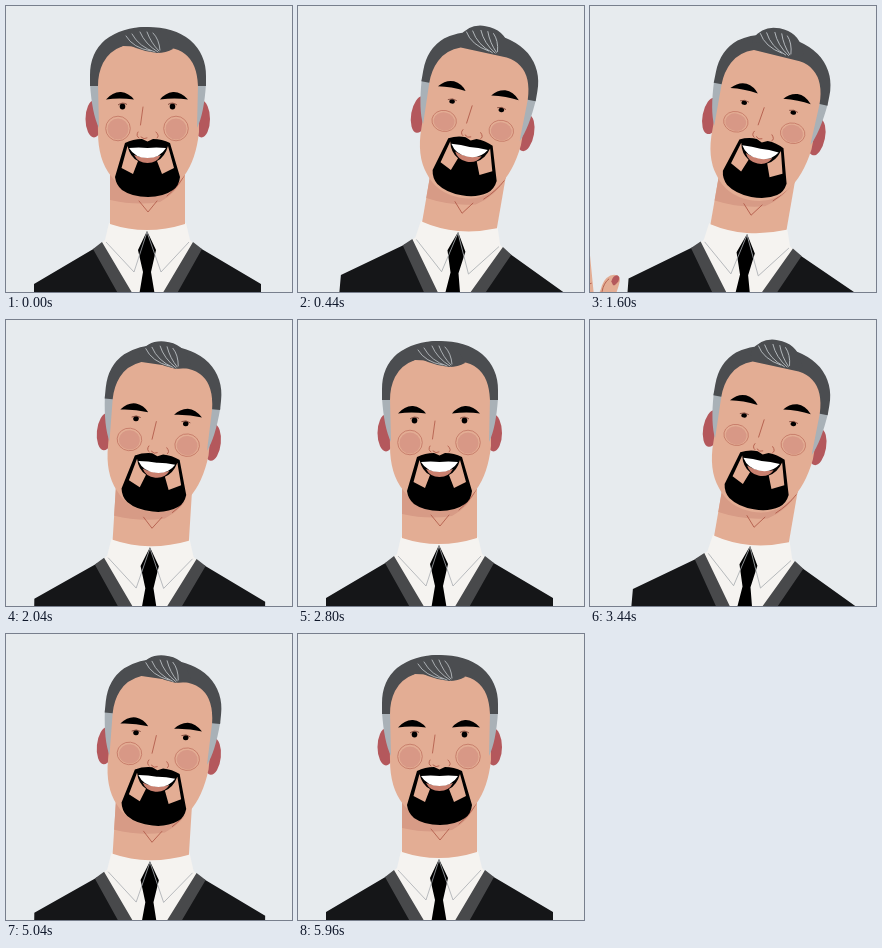
An HTML page that plays this animation: 286 by 286 pixels, repeating every 6000 ms.

```html
<!DOCTYPE html>
<html lang="en">
<head>
<meta charset="utf-8">
<title>Waving man</title>
<style>
  html, body { margin: 0; width: 100%; height: 100%; overflow: hidden; background: #e7ebee; }
  svg { display: block; width: 100vw; height: 100vh; }
  .skin { fill: #e3ad94; }
  .hair { fill: #4b4d50; }
  .grey { fill: #a9b1b7; }
  .ear { fill: #b4585c; }
  .line { fill: none; stroke: #b5604f; stroke-width: .9; stroke-linecap: round; stroke-linejoin: round; }
  .strand { fill: none; stroke: #c3c8cc; stroke-width: .8; stroke-linecap: round; }
  .seam { fill: none; stroke: #a9adb1; stroke-width: .8; stroke-linejoin: round; }
</style>
</head>
<body>
<svg viewBox="0 0 286 286" preserveAspectRatio="xMidYMid slice">
  <g id="hand">
    <path class="skin" d="M-32 340 L-24 222 Q-22 209 -13 210 Q-5 212 -6 224 L-9 268 Q-4 280 -2 272 L6 226 Q7 218 13 219 Q18 221 17 229 L11 292 Q17 290 21 281 Q27 272 35 273 Q42 275 39 281 Q33 295 18 312 L14 340Z"/>
    <path class="line" d="M6 237 Q10 240 15 238 M4 256 Q8 259 13 257 M2 276 Q6 279 11 277 M20 287 Q23 279 29 276"/>
    <path class="ear" d="M31 279 Q34 273 38 274 Q41 276 38 280 Q34 284 32 283Z"/>
  </g>

  <g id="body">
    <path fill="#f5f3f0" d="M103 217 L99 234 L92 240 L92 340 H190 V240 L184 234 L180 217Z"/>
    <path fill="#151618" d="M28 340 V278 L89 242 L125 302 V340Z M255 340 V278 L194 242 L158 302 V340Z"/>
    <path fill="#48494b" d="M87 243 L96 236 L128 290 V316Z M196 243 L187 236 L155 290 V316Z"/>
    <path fill="#000" d="M141 225 L150 244 L145 266 L149 290 V330 H133 V290 L137 266 L132 244Z"/>
    <g id="neck">
      <path class="skin" d="M104 145 H179 V218 Q160 224 141 224 Q122 224 104 218Z"/>
      <path fill="#d79b86" d="M104 150 H179 V168 Q171 187 154 196 Q130 200 104 194Z"/>
      <path class="line" d="M133 195 L142 206 L151 195 M161 190 Q172 181 178 170"/>
    </g>
    <path class="seam" d="M100 236 L128 266 L141 226 L155 266 L183 236"/>
  </g>

  <g id="head">
    <g id="back">
      <ellipse class="ear" cx="88" cy="113" rx="8.5" ry="18.5"/>
      <ellipse class="ear" cx="195.500" cy="113" rx="8.500" ry="18.500"/>
      <path class="skin" d="M91 80 V62 Q96 34 141 34 Q187 34 193 62 V126 Q190 154 178 170 Q165 188 142 188 Q118 188 105 170 Q92 154 92 126Z"/>
      <path class="grey" d="M84 78 H92 L93 122 Q86 108 84 78Z M200 78 H192 L191 122 Q198 108 200 78Z"/>
      <path class="hair" d="M84 80 V69 Q84 47 99 34 Q116 21 141 21 Q168 21 184 34 Q200 48 200 70 V80 H192 Q191 57 179 48 Q173 43 164 42 L117 40 Q103 45 97 57 Q92 67 92 80Z"/>
    </g>
    <g id="tuft">
      <path class="hair" d="M114 36 Q121 21 138 21 Q157 21 164 37 L167 43 Q160 47 151 47 Q140 46 130 42 Q121 37 114 41Z"/>
      <path class="strand" d="M120 30 Q127 42 145 45 M126 28 Q133 41 149 46 M134 26 Q139 38 152 46 M141 26 Q145 37 153 45 M147 27 Q153 33 154 44"/>
    </g>
    <g id="front">
      <path id="brows" d="M100 93.500 Q107 85.500 115 86 Q123 87 128 93.500 Q113 91.500 100 93.500Z M182 93.500 Q175 85.500 167 86 Q159 87 154 93.500 Q169 91.500 182 93.500Z"/>
      <g id="eyes">
        <ellipse cx="116.500" cy="100.500" rx="2.800" ry="2.900"/>
        <ellipse cx="166.500" cy="100.500" rx="2.800" ry="2.900"/>
        <path fill="none" stroke="#6b352b" stroke-width=".8" d="M112 99 Q116.500 95.500 121 98.500 M162 98.500 Q166.500 95.500 171 99"/>
      </g>
      <g id="cheeks" fill="#d89886" stroke="#c27462" stroke-width=".8">
        <circle cx="112" cy="123" r="10.500" stroke="none"/>
        <circle cx="170" cy="123" r="10.500" stroke="none"/>
        <circle cx="112" cy="122.500" r="12.300" fill="none"/>
        <circle cx="170" cy="122.500" r="12.300" fill="none"/>
      </g>
      <path class="line" d="M137 101 L134.500 119 M132 126 Q129.500 130 133 132 M135 131 Q138 134 141 132 M150 126 Q154 130 151 132"/>
      <path d="M119 137 Q127 133 136 133 L141.500 135.500 L147 133 Q156 133 164 137 L174 171 Q173 180 167 184 Q157 191 142 191 Q126 191 116 184 Q110 179 109 171Z"/>
      <path class="skin" d="M121.500 140 Q124 151 132 155 L127 168 L115.500 162Z M162 140 Q159 151 151 155 L156 168 L168 162Z"/>
      <path fill="#c9806f" d="M128 149 Q141 154 155 149 Q151 157 141.500 157 Q132 157 128 149Z"/>
      <path fill="#fff" d="M123 142 Q133 141 141.500 142 Q150 141 160 142 Q154 152 141.500 152 Q129 152 123 142Z"/>
    </g>
  </g>
</svg>
<script>
  const PERIOD = 3000;
  const part = Object.fromEntries(
    ["hand", "body", "neck", "head", "back", "tuft", "front", "brows", "eyes", "cheeks"]
      .map(id => [id, document.getElementById(id)])
  );
  const move = (name, value) => part[name].setAttribute("transform", value);
  const squash = (name, y, k) => move(name, `translate(0 ${y * (1 - k)}) scale(1 ${k})`);

  const smooth = (t, from, to) => {
    const u = Math.min(1, Math.max(0, (t - from) / (to - from)));
    return u * u * (3 - 2 * u);
  };
  // Rises over the first span and falls over the second.
  const swing = (t, [a, b, c, d]) => smooth(t, a, b) - smooth(t, c, d);

  const timing = {
    body: [0, 400, 1380, 2260],
    head: [0, 620, 1400, 2620],
    hand: [230, 620, 1560, 2000]
  };

  function draw(t) {
    const lean = swing(t, timing.body);
    const tilt = swing(t, timing.head);
    const raise = swing(t, timing.hand);

    // The body sinks and widens a little between its two rests.
    const sink = lean * (1 - lean);
    const dx = 19 * lean;
    const dy = lean + 16 * sink;
    move("body", `translate(${141 + dx} ${226 + dy}) rotate(${5 * lean}) scale(${1 + 0.13 * sink} 1) translate(-141 -226)`);
    move("neck", `translate(0 222) skewX(${-6 * tilt}) translate(0 -222)`);
    move("head", `translate(${dx} ${dy}) rotate(${12.3 * tilt} 141 197)`);
    move("back", `translate(0 ${3 * tilt})`);
    move("tuft", `translate(0 ${-5 * tilt})`);
    move("front", `translate(${1.5 * tilt} ${-4 * tilt})`);
    move("brows", `translate(0 ${-6 * lean})`);
    squash("eyes", 99, 1 - 0.3 * tilt);
    squash("cheeks", 110, 1 - 0.18 * tilt);

    const wave = 8 * (Math.cos((t - 960) / 480 * 2 * Math.PI) - 0.866);
    const low = 1 - raise;
    move("hand", `translate(${-50 * low} ${85 * low}) rotate(${wave} -2 320)`);
  }

  const start = performance.now();
  function tick() {
    draw((performance.now() - start) % PERIOD);
    requestAnimationFrame(tick);
  }
  tick();
</script>
</body>
</html>
```
